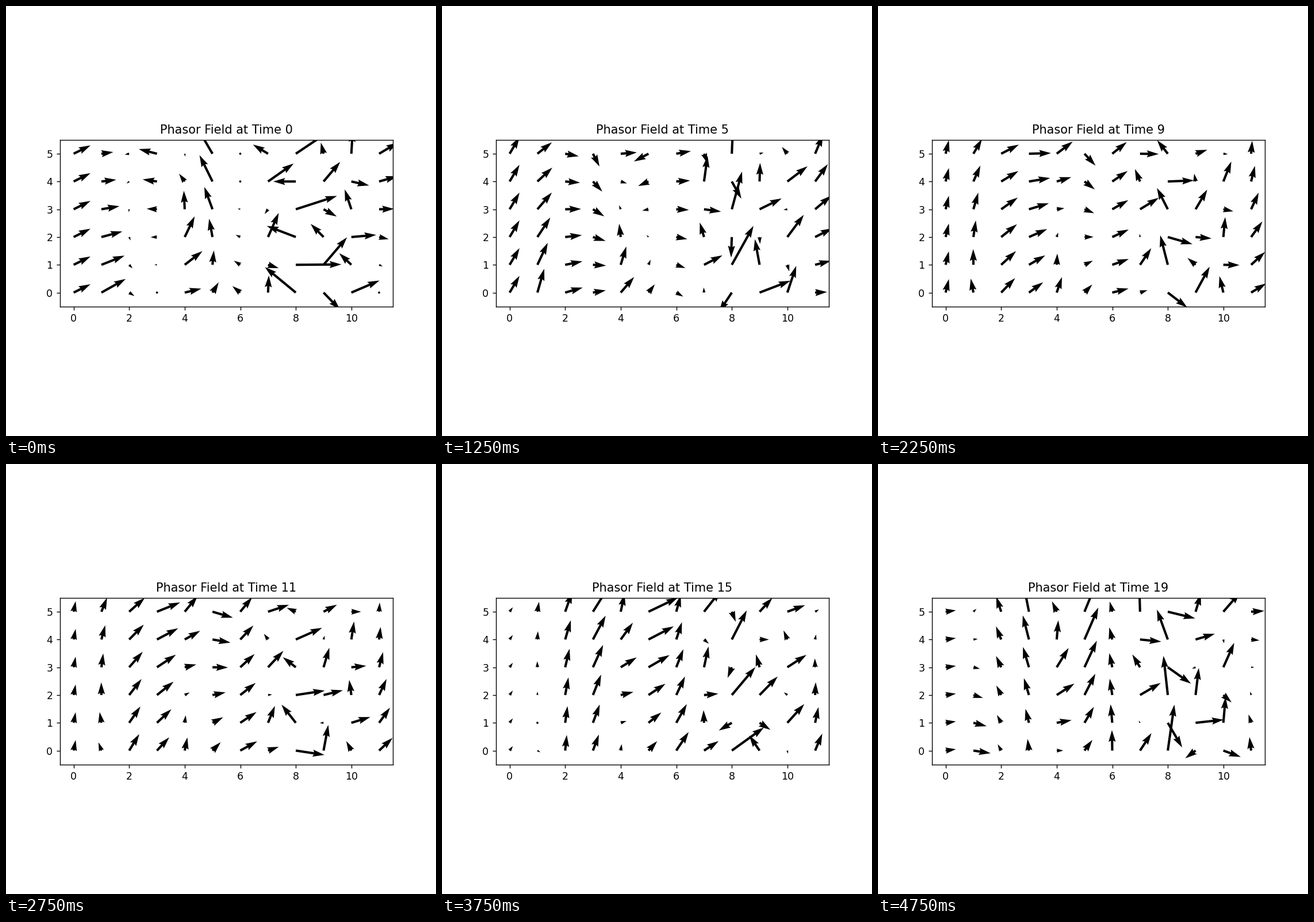
Write a matplotlib script that moves like this. It is 748 px wide and 748 px high and loops after 5000 ms.

```python
import numpy as np
import matplotlib.pyplot as plt
from matplotlib.animation import FuncAnimation

SIDE, DPI = 748, 125
FRAMES, INTERVAL = 20, 250
COLS, ROWS = 12, 6
CENTER = 0.27 + 0.33j          # shared mean of all phasors
OMEGA = np.radians(15.5)       # turn per frame
SWELL = 0.25                   # slow rise and fall of the radius

# Key values per column: starting angle and twist per row in degrees,
# then the radius at the bottom and at the top row in cells.
angle = [-5, 15, 260, 230, -30, 140, 190, 130, 157, -71, 8, 220]
twist = [0, -15, -8, -8, 54, 0, 10, 154, 190, 120, 165, 30]
low = [0.27, 0.5, 0.37, 0.3, 0.3, 0.05, 0.45, 0.3, 1.2, 0.8, 0.6, 0.33]
high = [0.27, 0.25, 0.45, 0.75, 0.4, 0.95, 0.33, 0.65, 0.83, 0.3, 0.45, 0.33]

gx, gy = np.meshgrid(np.arange(COLS), np.arange(ROWS))
phase = np.radians(angle + gy * twist)
radius = low + gy / (ROWS - 1) * np.subtract(high, low)


def field(n):
    """Phasors turning about the shared mean while their radius swells."""
    turn = OMEGA * n
    swell = 1 + SWELL * np.cos(turn)
    return CENTER + radius * swell * np.exp(1j * (phase + turn))


fig, ax = plt.subplots(figsize=(SIDE / DPI, SIDE / DPI), dpi=DPI)
ax.set_aspect("equal")
ax.set_xlim(-0.5, COLS - 0.5)
ax.set_ylim(-0.5, ROWS - 0.5)
ax.set_xticks(range(0, COLS, 2))
ax.set_yticks(range(ROWS))

first = field(0)
arrows = ax.quiver(gx, gy, first.real, first.imag,
                   angles="xy", scale_units="xy", scale=1)
title = ax.set_title("Phasor Field at Time 0")


def update(n):
    z = field(n)
    arrows.set_UVC(z.real, z.imag)
    title.set_text(f"Phasor Field at Time {n}")
    return arrows, title


anim = FuncAnimation(fig, update, frames=FRAMES, interval=INTERVAL,
                     repeat=True, repeat_delay=0)
plt.show()
```
